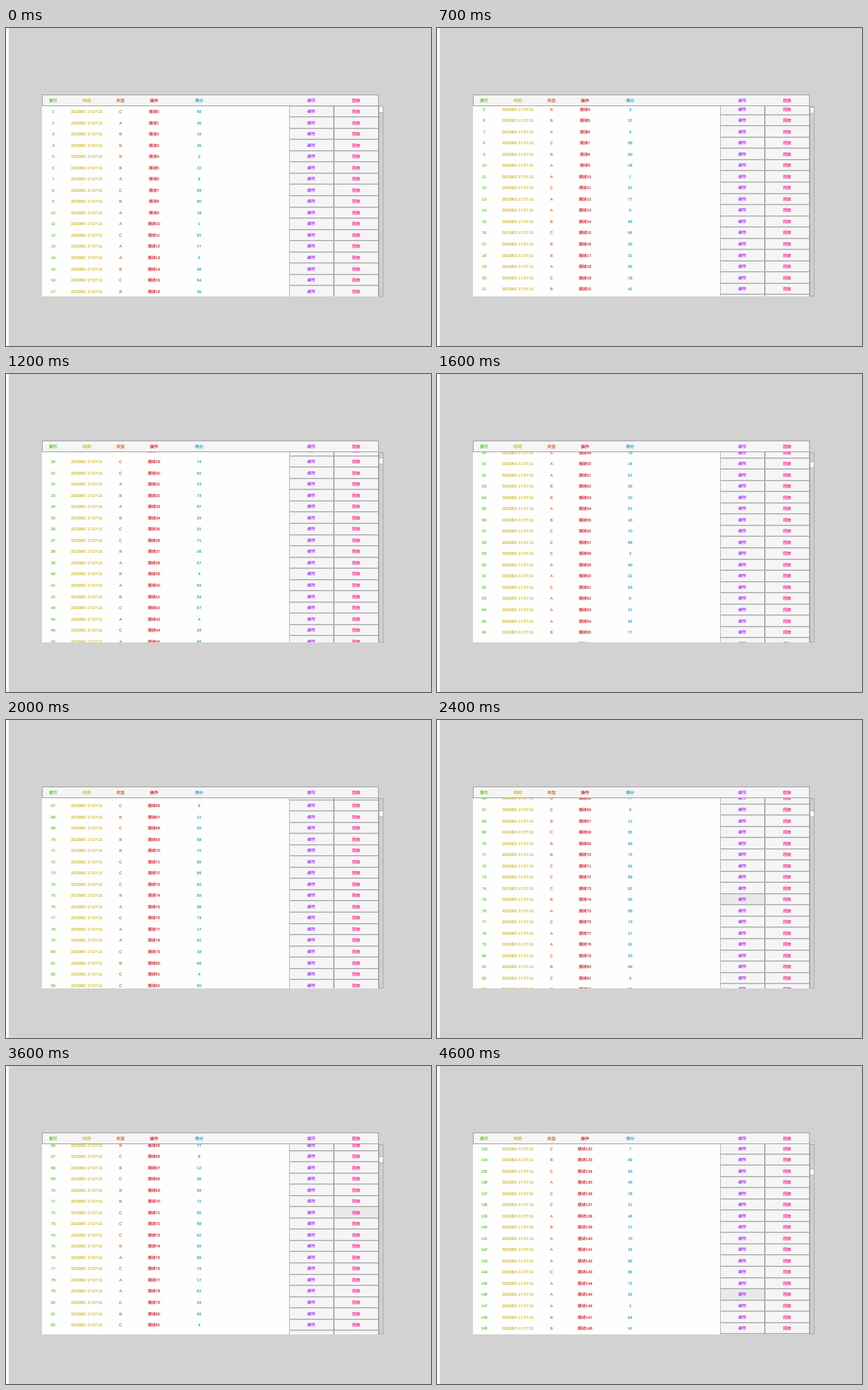
These frames come from a looping animation (626x468 px, 6200 ms). An HTML page with a canvas:

```html
<!DOCTYPE html>
<html>
<head>
<meta charset="utf-8">
<title>Scrolling table</title>
<style>
  html, body { margin: 0; width: 100%; height: 100%; overflow: hidden; background: #d2d2d2; }
  canvas { display: block; width: 626px; height: 468px; }
</style>
</head>
<body>
<canvas id="stage"></canvas>
<script>
const W = 626, H = 468, LOOP = 6200, STEP = 100;
const TOP = 115, BOTTOM = 395, PITCH = 16.53, ROWS = 1000;
const FONT = '"Liberation Sans", "Noto Sans CJK SC", "Noto Sans CJK", sans-serif';

const random = seed => Math.abs(Math.sin(seed * 12.9898) * 43758.5453) % 1;
const typeOf = n => 'ABC'[Math.floor(random(n) * 3)];
const scoreOf = n => String(Math.floor(random(n + 0.5) * 100));

const columns = [
  { x: 69.5, title: '索引', color: '#62cc35', text: String },
  { x: 119, title: '时间', color: '#cdb82c', text: () => '2023/8/1 17:27:11' },
  { x: 168.7, title: '类型', color: '#d4713c', text: typeOf },
  { x: 218, title: '操作', color: '#d8323c', text: n => '描述' + (n - 1) },
  { x: 284.5, title: '得分', color: '#3ba2c0', text: scoreOf },
  { x: 449.8, title: '细节', color: '#b033ff', text: () => '细节', left: 417 },
  { x: 515.8, title: '回放', color: '#ff2090', text: () => '回放', left: 483 }
];

const linear = p => p;
const easeOut = p => 1 - (1 - p) ** 2;
const settle = p => 1 - (1 - p) ** 2.2;

// Each move carries the list on from where the last one left it.
const moves = [
  { start: 600, end: 1600, to: 817.5, ease: p => p ** 1.07 },
  { start: 1600, end: 2000, to: 1088, ease: p => p * (1.25 - 0.25 * p) },
  { start: 2000, end: 2700, to: 1081, ease: settle },
  { start: 3700, end: 4100, to: 2183.5, ease: linear }
];

const hovers = [
  { start: 2200, end: 2800, row: 75, title: '细节' },
  { start: 3000, end: 3400, row: 74, title: '细节' },
  { start: 3400, end: 3800, row: 72, title: '回放' },
  { start: 4300, end: 4500, row: 147, title: '回放' },
  { start: 4500, end: LOOP, row: 146, title: '细节' }
];

function scrollAt(t) {
  let scroll = 0;
  for (const { start, end, to, ease } of moves) {
    const p = Math.min(1, Math.max(0, (t - start) / (end - start)));
    scroll += (to - scroll) * ease(p);
    if (p < 1) break;
  }
  return scroll;
}

const canvas = document.getElementById('stage');
const ctx = canvas.getContext('2d');
const ratio = window.devicePixelRatio || 1;
canvas.width = W * ratio;
canvas.height = H * ratio;
ctx.scale(ratio, ratio);
ctx.textAlign = 'center';
ctx.textRendering = 'geometricPrecision';

function rect(x, y, w, h, color) {
  ctx.fillStyle = color;
  ctx.fillRect(x, y, w, h);
}

function frame(x, y, w, h, color) {
  ctx.strokeStyle = color;
  ctx.lineWidth = 1;
  ctx.strokeRect(x, y, w, h);
}

// A hairline outline gives the tiny glyphs enough weight.
function label(text, x, y, size, color) {
  ctx.font = size + 'px ' + FONT;
  ctx.fillStyle = ctx.strokeStyle = color;
  ctx.lineWidth = 0.2;
  ctx.fillText(text, x, y + 2.1);
  ctx.strokeText(text, x, y + 2.1);
}

function drawButton(x, y, hovered) {
  const top = Math.round(y - PITCH / 2), bottom = Math.round(y + PITCH / 2);
  rect(x, top, 66, bottom - top, hovered ? '#e9e9e9' : '#f5f5f5');
  rect(x, top, 66, 1, '#d4d4d4');
  rect(x, bottom - 1, 66, 1, '#a6a6a6');
  rect(x, top, 1, bottom - top, '#b4b4b4');
  rect(x + 65, top, 1, bottom - top, '#a6a6a6');
}

function drawRows(scroll, hover) {
  ctx.save();
  ctx.beginPath();
  ctx.rect(53, TOP, 496, BOTTOM - TOP);
  ctx.clip();
  rect(53, TOP, 496, BOTTOM - TOP, '#fefefe');
  const first = Math.max(1, Math.floor(scroll / PITCH));
  for (let n = first; n < first + 20; n++) {
    const y = 123 + (n - 1) * PITCH - scroll;
    for (const c of columns) {
      if (c.left) drawButton(c.left, y, hover && hover.row === n && hover.title === c.title);
      label(c.text(n), c.x, y, 5.8, c.color);
    }
  }
  ctx.restore();
}

function drawHeader() {
  rect(53, 98, 496, 17, '#f5f5f5');
  frame(53.5, 98.5, 495, 16, '#9c9c9c');
  for (const c of columns) label(c.title, c.x, 106.6, 6.1, c.color);
}

function drawScrollbar(scroll) {
  const track = BOTTOM - TOP, handle = 10;
  const y = TOP + scroll * (track - handle) / (ROWS * PITCH - track);
  rect(549, TOP, 7, track, '#d0d0d0');
  frame(549.5, TOP + 0.5, 6, track - 1, '#a8a8a8');
  rect(549.5, y, 6, handle, '#fafafa');
  frame(549.5, y + 0.5, 6, handle - 1, '#a8a8a8');
}

function draw(time) {
  const t = Math.floor(time % LOOP / STEP) * STEP;
  const scroll = scrollAt(t);
  rect(0, 0, W, H, '#d2d2d2');
  rect(0, 0, 4, H, '#fff');
  drawRows(scroll, hovers.find(h => t >= h.start && t < h.end));
  drawHeader();
  drawScrollbar(scroll);
}

const start = performance.now();
function tick() {
  draw(performance.now() - start);
  requestAnimationFrame(tick);
}
tick();
</script>
</body>
</html>
```
